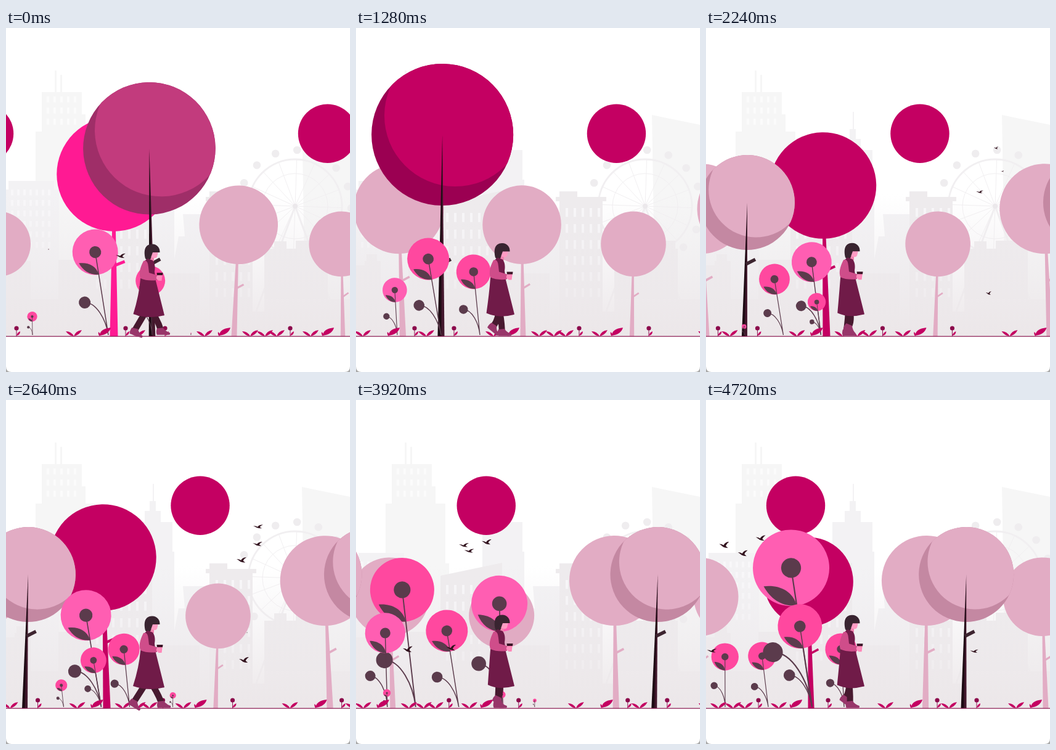
An HTML page that plays this animation: 558 px wide and 558 px high, repeating every 4.8 s.

```html
<!DOCTYPE html>
<html lang="en">
<head>
<meta charset="utf-8">
<title>Walk in the park</title>
<style>
html, body { margin: 0; width: 100%; height: 100%; overflow: hidden; background: #fff; }
svg { display: block; width: 100vw; height: 100vh; }
</style>
</head>
<body>
<svg viewBox="0 0 558 558" xmlns="http://www.w3.org/2000/svg">
  <defs>
    <linearGradient id="haze" x1="0" y1="0" x2="0" y2="1">
      <stop offset="0" stop-color="#eeebee" stop-opacity="0"/>
      <stop offset="1" stop-color="#ece7e9"/>
    </linearGradient>
    <linearGradient id="bark">
      <stop offset="0.45" stop-color="#1d0a13"/>
      <stop offset="0.6" stop-color="#43182d"/>
    </linearGradient>
  </defs>
  <g id="city"></g>
  <g id="scene"></g>
  <path d="M0 558V549Q0 558 9 558ZM558 558V549Q558 558 549 558Z" fill="#aaa"/>
</svg>
<script>
const LOOP = 4800, STEP = 80, PERIOD = 557, GROUND = 500;
const PALE = [226, 172, 196], CRIMSON = [196, 0, 98], HOT = [255, 26, 147];
const PALE_SHADE = [196, 136, 162], DEEP_SHADE = [155, 0, 82];
const DARK = '#5b3b4c', LEAF = '#c40062';
const HOT_PETAL = '#ff489f', SOFT_PETAL = '#ff5eb2';

const { sin, cos, exp, abs, PI } = Math;
const clamp = v => Math.max(0, Math.min(1, v));
const ease = v => (v = clamp(v), v < 0.5 ? 4 * v ** 3 : 1 - 4 * (1 - v) ** 3);
const smooth = v => (v = clamp(v), v * v * (3 - 2 * v));
const n = v => v.toFixed(2);
const deg = slope => Math.atan(slope) * 180 / PI;
const circle = (x, y, r, fill, more = '') =>
  `<circle cx="${n(x)}" cy="${n(y)}" r="${n(r)}" fill="${fill}" ${more}/>`;
const path = (d, fill, more = '') => `<path d="${d}" fill="${fill}" ${more}/>`;
const rect = (x, y, w, h, fill) =>
  `<rect x="${x}" y="${y}" width="${w}" height="${h}" fill="${fill}"/>`;
const group = (transform, body) => `<g transform="${transform}">${body}</g>`;

// Everything on the ground scrolls together, a little slower at first
const scroll = t => 0.0797 * t - 4 * sin(PI * t / LOOP);
const swell = (t, rise, fall) => ease((t - rise) / 500) - ease((t - fall) / 500);

function blend(a, b, p) {
  const dim = 1 - 0.4 * p * (1 - p);
  return `rgb(${a.map((v, i) => Math.round((v + (b[i] - v) * p * p) * dim))})`;
}

function windows(x, y, cols, rows, dx, dy, fill) {
  let s = '';
  for (let r = 0; r < rows; r++)
    for (let c = 0; c < cols; c++) s += rect(x + c * dx, y + r * dy, 4, dy * 0.55, fill);
  return s;
}

function wheel(x, y) {
  let spokes = '', cabins = '';
  for (let i = 0; i < 16; i++) {
    const a = (i * 22.5 - 88) * PI / 180, dx = cos(a), dy = sin(a);
    spokes += `M${x} ${y}l${n(76 * dx)} ${n(76 * dy)}`;
    cabins += circle(x + 91 * dx, y + 91 * dy, 6.3, '#efedef');
  }
  return `<g stroke="#f1eff1">${circle(x, y, 76, 'none', 'stroke-width="3"')}${circle(x, y, 53, 'none')}` +
    path(spokes, 'none') + path(`M${x - 67} 470L${x} ${y}L${x + 67} 470`, 'none', 'stroke-width="3"') +
    '</g>' + cabins + circle(x, y, 4, '#ebe8eb');
}

function city() {
  const far = '#f6f6f6', mid = '#f3f2f4', near = '#eeebed', pane = '#f8f7f9';
  return path('M480 141L558 157V500H486Z', far) +
    path('M79 69H82V104H79ZM88 76H91V104H88ZM58 104H123V140H129V168H145V265H151V500H48V168H58Z', far) +
    windows(66, 111, 5, 3, 11, 18, '#fbfbfb') +
    path('M238 136H240V164H243V180H251V198H270V246H273V500H205V198H225V180H233V164H238Z', mid) +
    path('M4 248H78V262H86V500H0V262H4Z', mid) + windows(8, 262, 7, 6, 10, 17, pane) +
    wheel(469, 289) +
    path('M137 285L237 264V500H137Z', near) + windows(146, 300, 7, 5, 13, 27, pane) +
    path('M287 302H331V500H273V375L280 338H290Z', mid) +
    path('M324 274H330V265H359V274H406V281H400V500H330V281H324Z', near) +
    windows(340, 292, 5, 6, 13, 26, pane) +
    path('M419 358H435V346H455V358H470V345H518V358H522V500H419Z', near) +
    path('M14 378H17V367H34V378H40V440H85V376H137V500H0V385H14Z', near) +
    path('M210 398H314V486H332V500H210Z', near) +
    path('M398 460H419V440H558V500H398Z', '#f0edef') +
    rect(0, 270, 558, 230, 'url(#haze)');
}

function tree(x, r, lean, p = 0, grow = 1, full = PALE) {
  const s = 1 + p * (grow - 1), R = r * s, H = R * 2.835;
  const fill = blend(PALE, full, p), b = R * 0.07, w = R * 0.028, k = H * 0.45;
  return group(`translate(${n(x)} ${GROUND}) rotate(${n(deg(lean))})`,
    path(`M${n(-b)} 0L${n(-w)} ${n(-H + R * 0.8)}H${n(w)}L${n(b)} 0Z`, fill) +
    path(`M0 ${n(4 - k)}L${n(R * 0.19)} ${n(-3 - k)}`, 'none', `stroke="${fill}" stroke-width="${n(R * 0.05)}"`) +
    circle(0, -H, R, fill));
}

function tallTree(x, lean, p, id) {
  const R = 77 + 38 * p, H = 217 + 110 * p, b = 4.5 + p;
  return group(`translate(${n(x)} ${GROUND}) rotate(${n(deg(lean))})`,
    `<clipPath id="${id}">${circle(0, -H, R)}</clipPath>` +
    circle(0, -H, R, blend(PALE_SHADE, DEEP_SHADE, p)) +
    circle(R * 0.18, -H - R * 0.27, R, blend(PALE, CRIMSON, p), `clip-path="url(#${id})"`) +
    path(`M0 ${n(-H)}L${n(b)} 0H${n(-b)}Z`, 'url(#bark)') +
    path('M0 -117L15 -125', 'none', 'stroke="#3d2530" stroke-width="5.5"'));
}

// A flower opens left of `open`, closes towards `close` and leans most in between
function flower(x, size, open, close, fill) {
  const r = size * smooth((open - x) / 100) * smooth((x - close) / 80);
  if (r < 0.3) return '';
  const lean = 0.03 - 0.2 * exp(-(((x - 145) / 85) ** 2));
  const q = (a, b) => `${n(a * r)} ${n(b * r)}`;
  return group(`translate(${n(x)} 498) rotate(${n(deg(lean))})`,
    circle(0, -3.68 * r, r, fill) +
    path(`M0 0L${q(0, -3.68)}M0 0C${q(0, -0.7)} ${q(-0.3, -1.5)} ${q(-0.8, -1.57)}`,
      'none', `stroke="${DARK}" stroke-width="${n(0.6 + r * 0.025)}"`) +
    path(`M${q(0, -2.68)}C${q(-0.05, -3.1)} ${q(-0.4, -3.3)} ${q(-0.78, -3.31)}C${q(-0.65, -2.95)} ${q(-0.4, -2.72)} ${q(0, -2.68)}Z`, DARK) +
    circle(0, -3.68 * r, 0.26 * r, DARK) +
    circle(-0.8 * r, -1.57 * r, 0.26 * r, DARK));
}

function flowers(dx) {
  const f = (x, ...rest) => flower(x - dx, ...rest);
  return f(407, 52, 250, -5, HOT_PETAL) + f(477, 34, 295, 52, HOT_PETAL) +
    f(300, 28, 310, 62, HOT_PETAL) + f(237, 34, 301, 46, HOT_PETAL) +
    f(166, 37, 300, 25, SOFT_PETAL) + f(361, 41, 257, -6, SOFT_PETAL) +
    f(548, 62, 304, 0, SOFT_PETAL) + f(43, 20, 300, 8, HOT_PETAL) +
    f(361, 21, 250, 22, HOT_PETAL) + f(548, 37, 262, 0, HOT_PETAL) +
    f(600, 27, 310, 0, HOT_PETAL);
}

const sprig = path('M0 0Q-4 -8 -13 -8Q-8 -1 0 0Q3 -9 13 -10Q9 -2 0 0Z', LEAF);
const blade = path('M-8 -1Q-8 -12 10 -14Q7 -3 -8 -1ZM-8 0Q-11 -3 -10 -7Q-6 -4 -8 0Z', LEAF);
const bud = path('M0 0V-13', 'none', 'stroke="#8c1250"') + circle(0, -13, 3.6, '#8c0a4c') +
  path('M0 -1Q1 -6 6 -8Q6 -2 0 -1Z', LEAF);

function grass(dx) {
  const plant = (shape, xs) => xs.map(x => {
    const left = ((x - dx + 20) % PERIOD + PERIOD) % PERIOD - 20;
    return group(`translate(${n(left)} ${GROUND})`, shape) +
      group(`translate(${n(left + PERIOD)} ${GROUND})`, shape);
  }).join('');
  return plant(sprig, [110, 213, 322, 396, 420, 439, 494]) +
    plant(blade, [160, 354, 522]) + plant(bud, [17, 194, 258, 461]);
}

// x, y hold at 2640 ms; the bird unfolds as it passes `from`
function bird(t, x, y, speed, rise, from = 510) {
  const d = t - 2640, X = x - speed * d;
  const size = 0.88 * clamp((from - X) / 90);
  if (size < 0.02 || X < -20) return '';
  const flap = 1 + 0.25 * sin(t / 90 + x);
  return group(`translate(${n(X)} ${n(y - rise * sin(d / 900))}) scale(${n(size)} ${n(size * flap)})`,
    path('M-9 -1Q-4 -1 -1 1Q2 -4 9 -4Q4 -1 3 2L7 5Q1 5 -2 3.5Q-5 1 -9 -1Z', '#33141f'));
}

const birds = t =>
  bird(t, 409, 205, 0.154, -25) + bird(t, 408, 233, 0.182, -2) + bird(t, 382, 259, 0.155, 15) +
  bird(t, 386, 421, 0.181, 20) + bird(t, 391, 377, 0.24, -27, 405) +
  bird(t, 851, 407, 0.2, 0) + bird(t, -606, 369, 0.3, 0);

// phase 0..1 is the planted half of the stride, 1..2 the swing
function leg(phase, drop) {
  const reach = cos(PI * phase);
  const lift = 8 * Math.max(0, -sin(PI * phase));
  const heel = 45 * Math.max(0, sin(PI * (phase - 0.75)));
  const x = 230 + 22 * reach, y = 491 - lift * 0.7 - heel * 0.06;
  const kx = 232 + 13 * reach + lift * 0.6;
  return path(`M231 ${n(452 + drop)}Q${n(kx)} ${n(471 + drop)} ${n(x)} ${n(y)}`,
      'none', 'stroke="#47192f" stroke-width="10"') +
    group(`translate(${n(x)} ${n(y)}) rotate(${n(heel)})`,
      path('M-6 -2L4 -3Q8 3 15 5Q16 8 14 8.5H-6Q-8 4 -6 -2Z', '#98366a'));
}

function walker(t) {
  const phase = ((t - 2640) / 850 + 8) % 2;
  const wide = abs(cos(PI * phase)), drop = 2 * wide - 1;
  const hem = n(214 - 8 * wide);
  return leg((phase + 1) % 2, drop) + leg(phase, drop) + group(`translate(0 ${n(drop)})`,
    path('M232 368H240V377L235 381L230 375Z', '#f283b0') +
    path('M235 360H247.5L245 370Q243 373 240 372L235 371Z', '#ff9cc4') +
    path('M226 373C223 360 225 350 237 349.5C246 349.5 250 357 249.5 363H238L235.5 370Q235 375 231 375.5Q228 375.5 226 373Z', '#392430') +
    path(`M230 373L238 376Q243 383 241 394L243 409L257 465Q232 472 ${hem} 463Q216 432 218 406Q219 378 230 373Z`, '#701b48') +
    path('M223 377Q230 374 231 387L232 396L245 400V408Q229 410 218 405Q214 394 223 377Z', '#cf4d8a') +
    path('M245 397H254L252.5 409H247Z', '#ff86b8') +
    path('M244.5 396H254.5L254 400H245Z', '#3a1426') +
    circle(247.5, 404, 3.6, '#ff8dbc'));
}

function scene(t) {
  const dx = scroll(t);
  const leanA = 0.07 * exp(-t / 1000) - 0.03;
  const leanB = 0.028 * sin((t - 600) / 1050);
  const leanC = -0.04 * sin(t / 1400);
  const leanTall = 0.028 * sin((t - 900) / 1600);
  const sun = x => circle(x - dx, 171.3, 47.7, LEAF);
  return sun(521.5) + sun(521.5 - PERIOD) +
    tree(175 - dx, 73, leanC, swell(t, -1000, 420), 1.27, HOT) +
    tree(370 - dx, 63.8, leanA, swell(t, 1460, 3045), 1.352, CRIMSON) +
    tree(546.5 - dx, 52.8, leanB, swell(t, 3850, 2 * LOOP), 1.37, CRIMSON) +
    tree(546.5 - PERIOD - dx, 52.8, leanB) +
    tree(175 + PERIOD - dx, 73, leanC) +
    tree(370 + PERIOD - dx, 63.8, leanA) +
    tallTree(237 - dx, leanTall, swell(t, -315, 1600), 'crownA') +
    tallTree(237 + PERIOD - dx, leanTall, 0, 'crownB') +
    flowers(dx) + grass(dx) + rect(0, 499.6, 558, 1.2, '#8a1a52') +
    circle(69 - dx, 359, 0.8, '#7a5a68') + birds(t) + walker(t);
}

document.getElementById('city').innerHTML = city();
const stage = document.getElementById('scene');
const start = performance.now();
let shown = -1;
function frame() {
  const t = Math.floor(((performance.now() - start) % LOOP) / STEP) * STEP;
  if (t !== shown) stage.innerHTML = scene(shown = t);
  requestAnimationFrame(frame);
}
frame();
</script>
</body>
</html>
```
